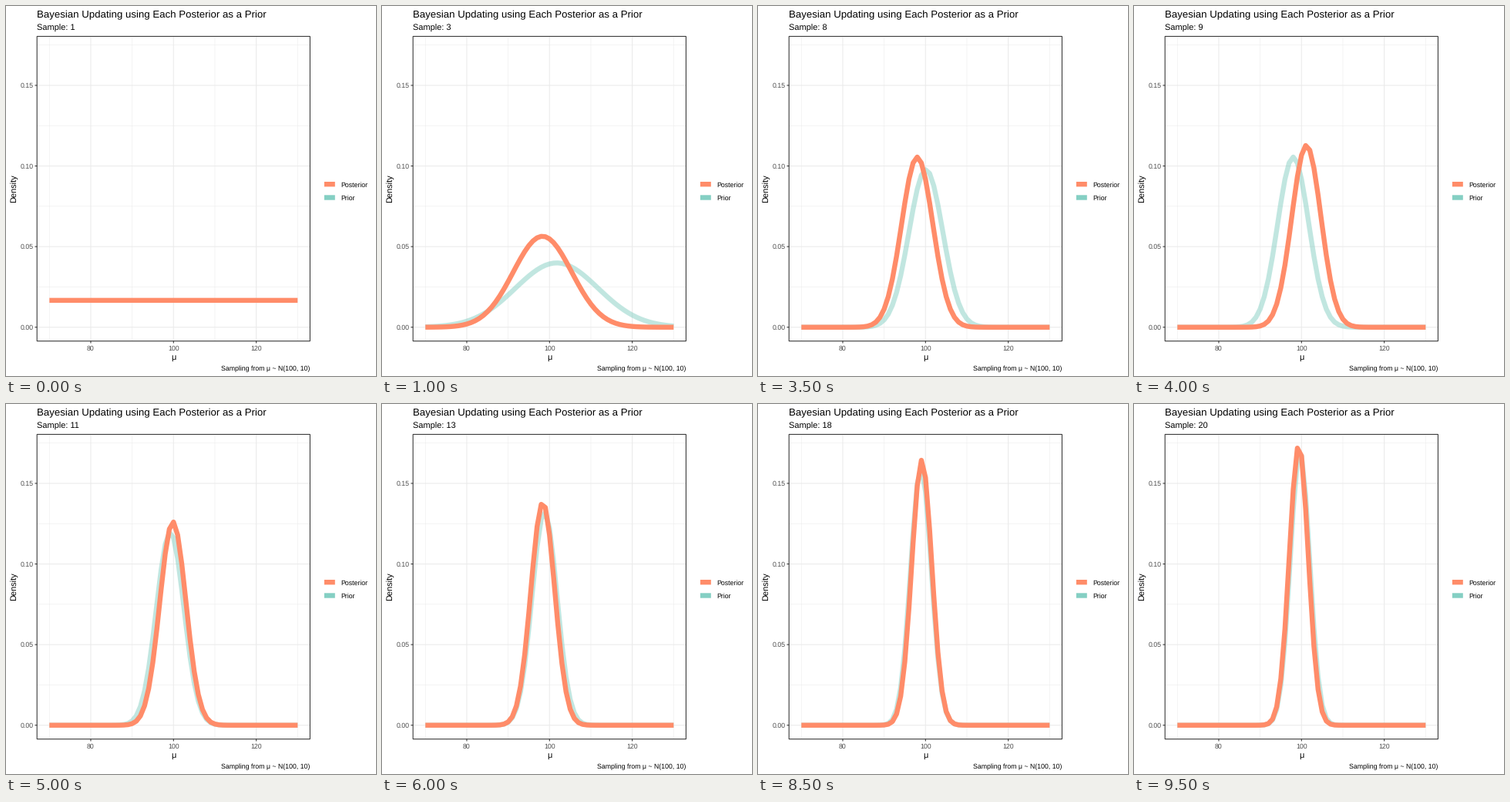
Animation of 480 by 480 pixels, one loop 10000 ms. Source, as a matplotlib script:

```python
import numpy as np
import matplotlib.pyplot as plt
from matplotlib.animation import FuncAnimation
from matplotlib.patches import Rectangle

plt.rcParams["font.family"] = "Liberation Sans"
plt.rcParams["text.hinting"] = "none"

SIZE, DPI = 480, 72
LEFT, RIGHT, TOP, BOTTOM = 40.2, 394.4, 39.4, 434.7
X_MIN, X_MAX = 67, 133
PEAK = 0.1718
Y_MIN, Y_MAX = -0.05 * PEAK, 1.05 * PEAK

ORANGE, TEAL = "#FF8C69", "#84CFC3"
GRID, DARK, TICK_TEXT = "#EBEBEB", "#333333", "#4D4D4D"
MAJOR, MINOR, THICK = 1.07, 0.53, 6.4

# Posterior mean after each sample; the first posterior is flat.
MEANS = [None, 101.75, 98.3, 99.1, 96.3, 98.9, 100.1, 98.0, 101.18, 99.2,
         99.85, 98.8, 98.38, 98.1, 98.58, 99.76, 98.9, 99.1, 99.62, 99.35]
MU = np.arange(70, 131)


def px(x):
    return LEFT + (x - X_MIN) / (X_MAX - X_MIN) * (RIGHT - LEFT)


def py(y):
    return BOTTOM - (y - Y_MIN) / (Y_MAX - Y_MIN) * (BOTTOM - TOP)


def density(step):
    """Posterior density on the grid after the given step."""
    if step <= 0:
        return np.full(MU.shape, 1 / 60)
    sd = 10 / np.sqrt(step)
    z = (MU - MEANS[step]) / sd
    return np.exp(-z ** 2 / 2) / (sd * np.sqrt(2 * np.pi))


fig = plt.figure(figsize=(SIZE / DPI, SIZE / DPI), dpi=DPI, facecolor="white")
ax = fig.add_axes([0, 0, 1, 1])
ax.set_xlim(0, SIZE)
ax.set_ylim(SIZE, 0)
ax.axis("off")


def line(xs, ys, color, width, z, **kw):
    return ax.plot(xs, ys, color=color, lw=width, zorder=z, snap=False,
                   solid_capstyle="butt", solid_joinstyle="round", **kw)[0]


def label(x, y, text, size, color="black", ha="left", **kw):
    return ax.text(x, y, text, size=size, color=color, ha=ha, va="baseline", **kw)


def grid(xs, ys, width, z):
    for x in xs:
        line([px(x)] * 2, [TOP, BOTTOM], GRID, width, z)
    for y in ys:
        line([LEFT, RIGHT], [py(y)] * 2, GRID, width, z)


x_ticks, y_ticks = (80, 100, 120), (0, 0.05, 0.10, 0.15)
grid((70, 90, 110, 130), (0.025, 0.075, 0.125, 0.175), MINOR, 1)
grid(x_ticks, y_ticks, MAJOR, 2)

for x in x_ticks:
    line([px(x)] * 2, [BOTTOM, BOTTOM + 2.75], DARK, MAJOR, 2)
    label(px(x), 447, str(x), 8.8, TICK_TEXT, "center")
for y in y_ticks:
    line([LEFT - 2.75, LEFT], [py(y)] * 2, DARK, MAJOR, 2)
    label(35.3, py(y) + 3.15, f"{y:.2f}", 8.8, TICK_TEXT, "right")

ax.add_patch(Rectangle((LEFT, TOP), RIGHT - LEFT, BOTTOM - TOP, fill=False,
                       ec=DARK, lw=MAJOR, zorder=5, snap=False))

label(LEFT, 15, "Bayesian Updating using Each Posterior as a Prior", 13.2)
subtitle = label(LEFT, 32, "", 11)
label(px(100), 459, "μ", 11, ha="center")
label(13.5, (TOP + BOTTOM) / 2, "Density", 11, ha="center",
      rotation=90, rotation_mode="anchor")
label(RIGHT, 473, "Sampling from μ ~ N(100, 10)", 8.8, ha="right")

for y, name, color in ((231.2, "Posterior", ORANGE), (248.5, "Prior", TEAL)):
    line([412.9, 426.8], [y, y], color, THICK, 3)
    label(434, y + 3.5, name, 8.8)

prior = line(px(MU), py(density(0)), TEAL, THICK, 3, alpha=0.5)
posterior = line(px(MU), py(density(0)), ORANGE, THICK, 4)


def update(step):
    prior.set_ydata(py(density(step - 1)))
    prior.set_visible(step > 0)
    posterior.set_ydata(py(density(step)))
    subtitle.set_text(f"Sample: {step + 1}")
    return prior, posterior, subtitle


anim = FuncAnimation(fig, update, frames=len(MEANS), interval=500,
                     repeat=True, repeat_delay=0)
plt.show()
```
